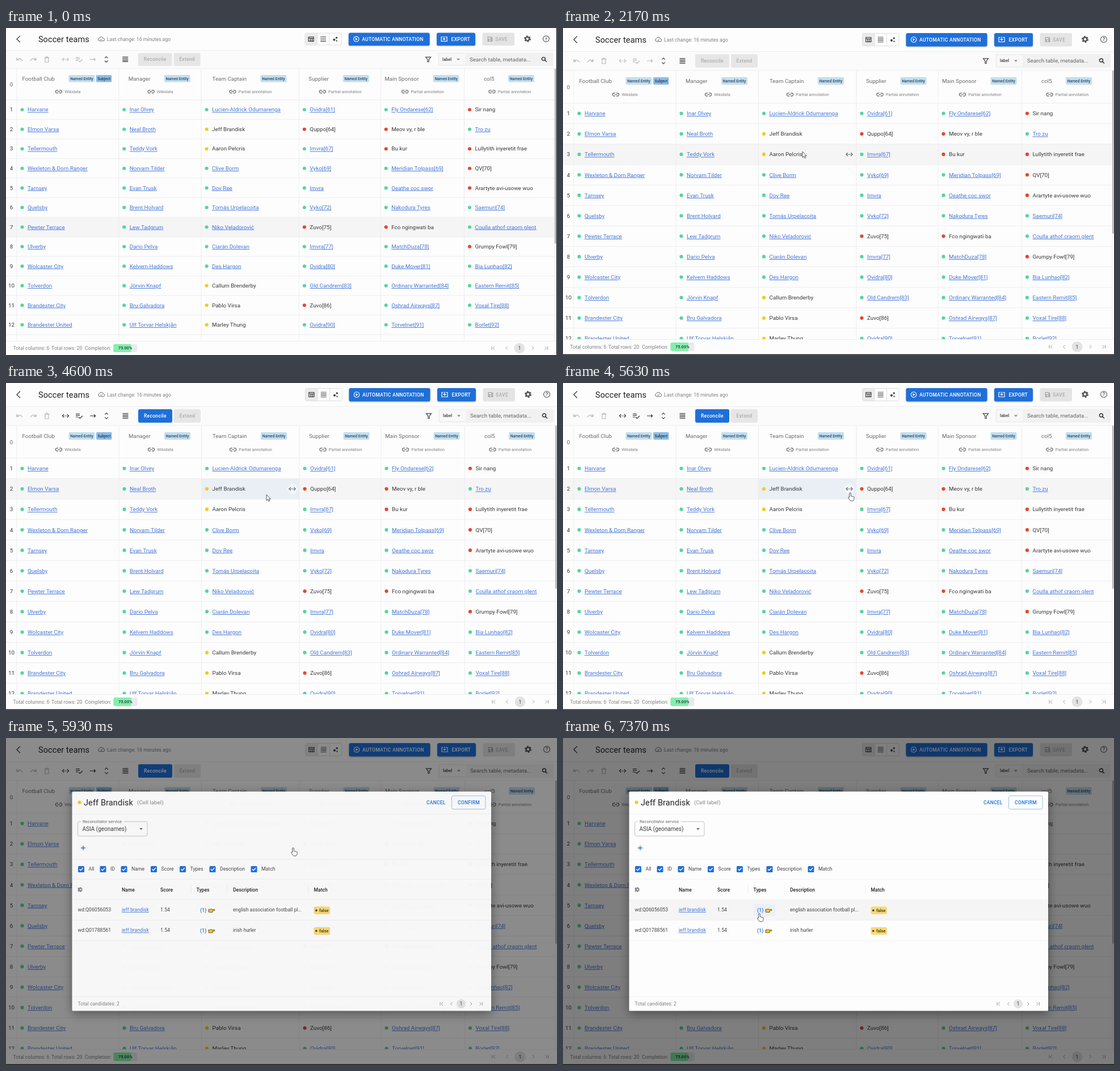
An HTML page for the animation above (8 s loop, 971 by 577 pixels).

```html
<!DOCTYPE html>
<html lang="en">
<head>
<meta charset="utf-8">
<title>Soccer teams</title>
<style>
html, body { margin: 0; width: 100%; height: 100%; overflow: hidden; background: #fdfdfd; }
svg { display: block; width: 971px; height: 577px; font-family: Roboto, Arial, sans-serif; }
.link { text-decoration: underline rgba(70, 121, 221, .6); text-decoration-thickness: .7px; text-underline-offset: 1.6px; }
#dialog > rect:first-child { filter: drop-shadow(0 5px 9px rgba(0,0,0,.4)); }
.raised { filter: drop-shadow(0 1px 1px rgba(0,0,0,.3)); }
</style>
</head>
<body>
<svg id="stage" viewBox="0 0 971 577"></svg>
<script>
const BLUE = '#1f6fd9', LINK = '#4677da', INK = '#3a3a3a', GREY = '#808080', FAINT = '#b9b9b9', LINE = '#ededf1';
const TOP = 132.7, ROW = 36.1, DURATION = 8000;
const edges = [19, 199, 344.5, 517, 661, 808.5, 968];
const dotX = [28.5, 208.5, 354, 526.5, 670.5, 818];

// Prefix "!" marks a red cell, "~" a yellow one; the rest are green links.
const cells = [
  'Harvane|Inar Olvey|Lucien-Aldrick Odumarenga|Ovidra[61]|Fly Ondarese[62]|!Sir nang',
  'Elmon Varsa|Neal Broth|~Jeff Brandisk|!Quppo[64]|!Meov vy, r ble|Tro zu',
  'Tellermouth|Teddy Vork|~Aaron Pelcris|Imvra[67]|!Bu kur|!Lullytith inyeretit frae',
  'Wexleton &amp; Dorn Ranger|Norvam Tilder|Clive Borm|Vyko[69]|Meridian Tolpass[69]|!QV[70]',
  'Tarnsey|Evan Trusk|Dov Ree|Imvra|Oeathe coc swor|!Arartyte avi-usowe wuo',
  'Quelsby|Brent Holvard|Tomás Urpelacoita|Vyko[72]|Nakodura Tyres|Saemuri[74]',
  'Pewter Terrace|Lew Tadgrum|Niko Veladorović|!Zuvo[75]|!Fco ngingwati ba|Coulla athof craom glent',
  'Ulverby|Dario Pelva|Ciarán Dolevan|Imvra[77]|MatchDuza[78]|!Grumpy Fowl[79]',
  'Wolcaster City|Kelvern Haddows|Des Hargon|Ovidra[80]|Duke Mover[81]|Bia Lunhao[82]',
  'Tolverdon|Jörvin Knapf|~Callum Brenderby|Old Candrem[83]|Ordinary Warranted[84]|Eastern Remit[85]',
  'Brandester City|Bru Galvadora|~Pablo Virsa|!Zuvo[86]|Oshrad Airways[87]|Voxal Tire[88]',
  'Brandester United|Ulf Torvar Helskjån|~Marley Thung|Ovidra[90]|Torvelnet[91]|Borlet[92]'
].map(row => row.split('|'));

// name, name x, chip x, link icon x, annotation
const columns = [
  ['Football Club', 28.5, 110.5, 93, 'Wikidata'],
  ['Manager', 216, 279, 256, 'Wikidata'],
  ['Team Captain', 364, 449, 400, 'Partial annotation'],
  ['Supplier', 534, 594.5, 558.5, 'Partial annotation'],
  ['Main Sponsor', 668, 753.5, 704, 'Partial annotation'],
  ['col5', 843, 886, 857.5, 'Partial annotation']
];

const text = (x, y, s, size = 9.9, fill = INK, extra = '') =>
  `<text x="${x}" y="${y + size * .355}" font-size="${size}" fill="${fill}" ${extra}>${s}</text>`;
const middle = 'text-anchor="middle"', medium = 'font-weight="500"', caps = 'font-weight="500" letter-spacing=".0286em"';
const rect = (x, y, w, h, fill, r = 0, extra = '') =>
  `<rect x="${x}" y="${y}" width="${w}" height="${h}" rx="${r}" fill="${fill}" ${extra}/>`;
const circle = (x, y, r, fill, extra = '') => `<circle cx="${x}" cy="${y}" r="${r}" fill="${fill}" ${extra}/>`;
const stroke = (x, y, d, color = '#444', w = 1.2) =>
  `<path transform="translate(${x} ${y})" d="${d}" fill="none" stroke="${color}" stroke-width="${w}"/>`;
const shape = (x, y, d, fill = '#444') => `<path transform="translate(${x} ${y})" d="${d}" fill="${fill}"/>`;
const hline = (y, x1, x2, c = LINE) => stroke(x1, y, `M0 0H${x2 - x1}`, c, 1);
const vline = (x, y1, y2, c = LINE) => stroke(x, y1, `M0 0V${y2 - y1}`, c, 1);

const ARROWS = 'M-2.8-2.8-5.6 0l2.8 2.8M2.8-2.8 5.6 0 2.8 2.8M-3.4 0h1.6M-.8 0h1.6M1.8 0h1.6';
const CHAIN = 'M-1-2.6h-2a2.6 2.6 0 0 0 0 5.2h2M1-2.6h2a2.6 2.6 0 0 1 0 5.2h-2M-2.5 0h5';
const LINES = 'M-5-4.2H5M-5-1.4H5M-5 1.4H5M-5 4.2H5';
const CARET = 'M-3-1.5h6L0 1.7z';
const UNDO = 'M-5-3v4h4M-4.6.6Q1-4.5 5 2.5', REDO = 'M5-3v4h-4M4.6.6Q-1-4.5-5 2.5';

function pager(xs, y, r) {
  const marks = ['M2.5-3-.5 0l3 3M-2.5-3v6', 'M1.5-3-1.5 0l3 3', '', 'M-1.5-3 1.5 0l-3 3', 'M-2.5-3 .5 0l-3 3M2.5-3v6'];
  return circle(xs[2], y, r, '#e3e3e3') + text(xs[2], y, '1', 8.6, INK, middle) +
    xs.map((x, i) => stroke(x, y, marks[i], '#999', 1)).join('');
}

function topBar() {
  const play = circle(618, 20.5, 4.7, 'none', 'stroke="#fff" stroke-width="1.1"') + shape(618, 20.5, 'M-1.4-2.4 2.4 0l-3.8 2.4z', '#fff');
  const gear = circle(920, 20, 3.4, 'none', 'stroke="#555" stroke-width="2.5"') +
    circle(920, 20, 5.2, 'none', 'stroke="#555" stroke-width="1.8" stroke-dasharray="2.7 2.75"');
  return rect(0, 0, 980, 41.5, '#fdfdfd') + hline(41.5, 0, 980) +
    stroke(22, 20.5, 'M3-6-3 0l6 6', '#444', 1.4) +
    text(57, 20.5, 'Soccer teams', 14.5, '#222', 'letter-spacing=".0075em"') +
    stroke(168, 20.5, 'M-3 3.3a2.7 2.7 0 0 1-.3-5.3 3.6 3.6 0 0 1 6.7.4 2.4 2.4 0 0 1-.3 4.9zM-1.8.4-.4 1.8l2.5-2.6', '#666', 1) +
    text(178, 20.5, 'Last change: 16 minutes ago', 8.8, GREY) +
    rect(527.5, 9.5, 64.5, 22, '#fdfdfd', 2.5, 'stroke="#dedede"') + rect(528, 10, 21, 21, '#ebebeb') +
    vline(549, 10, 31, '#dedede') + vline(570.5, 10, 31, '#dedede') +
    stroke(538.3, 20.5, 'M-4.5-4h9v8h-9zM-4.5-1.5h9M-1.2-1.5v5.5M1.8-1.5v5.5', '#333', 1.2) +
    stroke(559.7, 20.5, LINES, '#555', 1.1) +
    circle(579, 21.8, 2.1, '#444') + circle(583.2, 18, 1.7, '#444') + circle(583.4, 23.8, 1.2, '#444') +
    rect(604.5, 9, 143, 23.5, BLUE, 3, 'class="raised"') + play +
    text(628, 20.5, 'AUTOMATIC ANNOTATION', 8.6, '#fff', caps) +
    rect(760, 9, 68, 23.5, BLUE, 3, 'class="raised"') +
    stroke(773, 20.5, 'M-2-4h-3v8H5v-8H2M0-5v6M-2.2-1 0 1.2 2.2-1', '#fff', 1.2) +
    text(785.5, 20.5, 'EXPORT', 8.6, '#fff', caps) +
    rect(840.5, 9, 56.5, 23.5, '#e4e4e4', 3) +
    shape(854, 20.5, 'M-4.5-4.5h7l2 2v7h-9zM-3-3v2.4h4.5V-3zM0 .5a1.5 1.5 0 1 0 .01 0z', '#adadad') +
    text(863, 20.5, 'SAVE', 8.6, '#adadad', caps) + gear +
    circle(953, 20, 5.5, 'none', 'stroke="#555" stroke-width="1.1"') + text(953, 20.2, '?', 8.4, '#444', middle + ' ' + medium);
}

function toolbar() {
  return rect(0, 42, 980, 32.5, '#fbfbfb') + hline(75, 0, 980) +
    stroke(24, 58, UNDO, FAINT, 1.3) + stroke(48, 58, REDO, FAINT, 1.3) +
    stroke(72, 58, 'M-3-3v8h6v-8zM-4.3-3.4h8.6M-1.5-4.8h3', FAINT, 1.2) +
    `<g id="tools">${stroke(105, 58, ARROWS, 'currentColor')}${stroke(129, 58, 'M-6-3.5h7M-6-.8h7M-6 2h4M-1 2.2 1.4 4.5 6 0', 'currentColor')}${stroke(153, 58, 'M-5 0h9M2-2.5 4.6 0 2 2.5', 'currentColor')}</g>` +
    stroke(177, 58, 'M-2.8-2.4 0-5.2l2.8 2.8M-2.8 2.4 0 5.2l2.8-2.8') + stroke(210.5, 58, LINES, '#333', 1.3) +
    `<g id="reconcile">${rect(233, 46.2, 60, 23.8, 'currentColor', 3)}</g>` +
    `<g id="reconcileText">${text(243, 58, 'Reconcile', 8.6, 'currentColor', caps)}</g>` +
    rect(296, 46.2, 47, 23.8, '#e6e6e6', 3) + text(319.5, 58, 'Extend', 8.6, '#adadad', caps + ' ' + middle) +
    stroke(745, 58, 'M-4.5-4.2h9L1.1.3v4.2h-2.2V.3z') +
    rect(762, 45.5, 203, 24.5, '#f1f1f1', 3) + rect(764.5, 48, 46, 19.5, '#f8f8f8', 3) +
    text(770, 57.5, 'label', 7.5, INK, medium) + shape(798, 58, CARET, '#888') +
    text(818, 58, 'Search table, metadata...', 9.8, '#666') +
    stroke(949, 57, 'M2.4 0A3 3 0 1 1-3.6 0 3 3 0 0 1 2.4 0zM1.6 2.2 5 5.5', '#333', 1.5);
}

function tableHead() {
  return text(9.5, 104.5, '0', 9.9, '#666', middle) + columns.map(([name, x, chip, icon, note]) =>
    text(x, 94, name, 9.8, '#6c6c6c') + rect(chip, 86.8, 46, 13.2, '#c3deef', 2) +
    text(chip + 23, 93.4, 'Named Entity', 6.75, '#2b4a66', middle + ' ' + medium) +
    stroke(icon, 117.5, CHAIN, '#666', 1.2) + text(icon + 10.3, 117.5, note, 7.4, GREY)).join('') +
    rect(159, 86.8, 27.5, 13.2, '#8fbce4', 2) + text(172.8, 93.4, 'Subject', 6.75, '#1d3a58', middle + ' ' + medium);
}

function tableBody() {
  const marks = { '!': '#e5472e', '~': '#f0cd1c' };
  return cells.map((row, i) => {
    const y = TOP + ROW * (i + .5);
    return hline(y - ROW / 2, 0, 968) + text(9.5, y, i + 1, 9.9, INK, middle) + row.map((s, c) => {
      const mark = marks[s[0]];
      return circle(dotX[c], y, 3.1, mark || '#55d5a1') +
        text(dotX[c] + 9.5, y, mark ? s.slice(1) : s, 9.9, mark ? INK : LINK, mark ? '' : 'class="link"');
    }).join('');
  }).join('') + hline(TOP + ROW * 12, 0, 968) + edges.map(x => vline(x, 75, 590)).join('');
}

function footer() {
  return rect(0, 549, 980, 40, '#fdfdfd') + hline(549.5, 0, 980) +
    [[12.5, 'Total columns: 6'], [80, 'Total rows: 20'], [139, 'Completion:']].map(([x, s]) => text(x, 562.5, s, 8.7, GREY)).join('') +
    rect(189.5, 555, 42, 15, '#eaeaec', 3) + rect(189.5, 555, 31.5, 15, '#84efab', 3) +
    text(198, 562.5, '75.00%', 7.5, '#234', medium) +
    pager([859.5, 883, 906, 929.5, 953], 562.5, 9.5) + rect(0, 575.6, 980, 20, '#222');
}

function candidates() {
  const checks = [[132.5, 'All'], [171, 'ID'], [208, 'Name'], [260.5, 'Score'], [311.5, 'Types'], [364, 'Description'], [437, 'Match']];
  const heads = [[126.5, 'ID'], [204, 'Name'], [272, 'Score'], [335.5, 'Types'], [400, 'Description'], [542.5, 'Match']];
  const rows = [['wd:Q06056053', 'english association football pl...'], ['wd:Q01788561', 'irish hurler']];
  const finger = 'M-5-2.2h3l2-1 1 1.2h4a1 1 0 0 1 0 2H2.4l-.4 3h-4.5L-5 2.6z';
  return rect(117, 285.5, 738, 36, '#f5f5f5', 0, 'id="candidateHover"') +
    rect(336, 293, 38, 21, '#eaf0f9', 3, 'id="typesHover"') +
    [214, 249, 285.5, 321.5, 357.5, 456.5].map(y => hline(y, 117, 855, '#f0f0f3')).join('') +
    [326, 390, 533].map(x => vline(x, 259, 275)).join('') +
    checks.map(([x, s]) => rect(x - 5.5, 226, 11, 11, BLUE, 1.5) + stroke(x, 231.5, 'M-3 0-.9 2.2 3.2-2.2', '#fff', 1.4) + text(x + 13, 231.3, s, 8.7, '#444')).join('') +
    heads.map(([x, s]) => text(x, 267.5, s, 8.6, '#222', medium)).join('') +
    rows.map(([id, about], i) => {
      const y = 303 + 36.2 * i;
      return text(126.5, y, id, 8.7, '#444') + text(204, y, 'jeff brandisk', 8.7, LINK, 'class="link"') +
        text(272, y, '1.54', 8.7, '#444') + text(342, y + .5, '(1)', 8.9, BLUE, medium) +
        `<path transform="translate(362 ${y + 1.5})" d="${finger}" fill="#f6c62f" stroke="#4a3a10" stroke-width=".8"/>` +
        text(400, y, about, 8.6, '#444') + rect(542.5, y - 5.5, 28.5, 13.5, '#fbd873', 3) +
        circle(546.8, y + 1.2, 1.7, '#332') + text(552, y + 1.2, 'false', 7.5, '#332', medium);
    }).join('') +
    text(126.5, 469, 'Total candidates: 2', 8.7, GREY) + pager([767.5, 785, 802, 819.5, 837], 469, 8);
}

function dialog() {
  return rect(116.5, 94.5, 738.5, 387, '#fdfdfd', 1.5) + hline(134, 117, 855, '#f0f0f3') +
    circle(129.5, 113.5, 3.1, '#f0cd1c') + text(137, 113.5, 'Jeff Brandisk', 14.5, '#222', 'letter-spacing=".0075em"') +
    text(231, 113.5, '(Cell label)', 9.9, '#888') + text(741, 113.5, 'CANCEL', 8.5, BLUE, caps) +
    rect(785.5, 102, 59.5, 23.5, 'none', 3, 'stroke="#9dbdec"') + text(796, 113.5, 'CONFIRM', 8.5, BLUE, caps) +
    rect(126.5, 147.5, 122.5, 25.5, 'none', 3, 'stroke="#c2c2c2"') + rect(132, 145, 76, 5, '#fdfdfd') +
    text(135, 147.5, 'Reconciliator service', 7.5, '#666') + text(134.5, 160, 'ASIA (geonames)', 10, INK) +
    shape(238, 160.5, CARET, '#666') + stroke(136, 194, 'M-4 0h8M0-4v8', BLUE, 1.3) +
    `<g id="candidates">${candidates()}</g>`;
}

const stage = document.getElementById('stage');
stage.innerHTML = `
  <g id="page">
    ${rect(0, 0, 980, 620, '#fdfdfd')}
    ${rect(0, 0, 968, ROW, '#f5f5f5', 0, 'id="rowHover"')}
    ${rect(edges[2], TOP + ROW, edges[3] - edges[2], ROW, '#e9eff5', 0, 'id="selected"')}
    ${tableHead()}${tableBody()}
    <g id="cellIcon">${circle(0, 0, 9, '#f5f7f9', 'id="iconDisc"')}${stroke(0, 0, ARROWS, '#555')}</g>
    ${topBar()}${toolbar()}
    ${rect(968, 75, 2.6, 288, '#b5b5b5', 1, 'id="thumb"')}
    <g id="footer">${footer()}</g>
    ${rect(971, 0, 9, 620, '#222')}
  </g>
  ${rect(0, 0, 971, 577, '#000', 0, 'id="shade"')}
  <g id="dialog">${dialog()}</g>
  <g id="cursor" fill="#fff" stroke="#444" stroke-width=".9" stroke-linejoin="round">
    <path id="pointer" d="M0 0v10.5l2.5-2.3L4 11.8l1.8-.8-1.6-3.4h3.1z"/>
    <path id="hand" d="M-1.3 1a1.3 1.3 0 0 1 2.6 0v4.6l4.6.9q1.4.3 1.3 1.8l-.5 3.2q-.2 1.8-1.6 2.5H.7q-1.2-1-2.2-2.8l-2.1-3.4q.6-1.3 2.3 0z"/>
  </g>`;

const el = {};
stage.querySelectorAll('[id]').forEach(node => el[node.id] = node);
const show = (node, on) => node.style.display = on ? '' : 'none';
const clamp = v => Math.max(0, Math.min(1, v));
const lerp = (a, b, p) => a + (b - a) * p;

const route = [
  [900, 975, 230], [1270, 807, 146], [1670, 600, 160], [1730, 600, 160], [2170, 422, 218], [2370, 405, 222],
  [2970, 405, 222], [3400, 470, 192], [3630, 459, 197], [4600, 459, 197], [5130, 506, 194], [6530, 506, 194],
  [7330, 346, 310], [DURATION, 346, 310]
];

function cursorAt(t) {
  const i = Math.max(1, route.findIndex(k => k[0] > t));
  const [a, b] = [route[i - 1], route[i]];
  const p = clamp((t - a[0]) / (b[0] - a[0])), e = p * p * (3 - 2 * p);
  return [lerp(a[1], b[1], e), lerp(a[2], b[2], e)];
}

function draw(t) {
  // The window settles to its final height in five steps.
  const settle = t < 70 ? 0 : clamp((Math.floor((t - 70) / 82.5) + 1) / 5);
  el.page.setAttribute('transform', `scale(${lerp(.9988, 1, settle)} ${lerp(.956, 1, settle)})`);
  el.footer.setAttribute('transform', `translate(0 ${lerp(28.4, 0, settle)})`);
  el.thumb.setAttribute('height', lerp(323, 288, settle));

  const [x, y] = cursorAt(t);
  const moving = t >= 900, opening = t >= 5750, picked = t >= 3560;
  const row = t < 70 ? 6 : Math.floor((y - TOP) / ROW);
  const col = edges.findLastIndex(edge => x + 3 >= edge);
  const hovering = t < 70 || (moving && !opening && row >= 0 && row < 12);
  const iconShown = hovering && moving && col >= 0 && col < 6;
  const centre = TOP + ROW * (row + .5);
  const iconX = edges[Math.min(col, 5) + 1] - 12.5;

  show(el.rowHover, hovering);
  el.rowHover.setAttribute('y', TOP + ROW * row);
  el.cellIcon.setAttribute('transform', `translate(${iconX} ${centre})`);
  show(el.cellIcon, iconShown);
  show(el.iconDisc, picked && row === 1 && col === 2);
  show(el.selected, picked);
  el.tools.style.color = picked ? '#333' : FAINT;
  el.reconcile.style.color = picked ? BLUE : '#e6e6e6';
  el.reconcileText.style.color = picked ? '#fff' : '#adadad';

  const p = clamp((t - 5750) / 200);
  el.shade.setAttribute('opacity', p * .5);
  el.dialog.setAttribute('opacity', 1 - (1 - p) ** 1.3);
  show(el.dialog, p > 0);
  show(el.candidates, t >= 5870);
  const onTypes = opening && Math.abs(x - 350) < 18 && Math.abs(y - 303.5) < 10.5;
  show(el.candidateHover, y >= 285.5 && y < 321.5);
  show(el.typesHover, onTypes);

  const waiting = opening && t < 6560;
  const hand = onTypes || waiting || (iconShown && Math.hypot(x - iconX, y - centre) < 9);
  el.cursor.setAttribute('transform', `translate(${x} ${y})`);
  show(el.pointer, moving && !hand);
  show(el.hand, moving && hand);
}

const start = performance.now();
function tick() {
  draw((performance.now() - start) % DURATION);
  requestAnimationFrame(tick);
}
tick();
</script>
</body>
</html>
```
